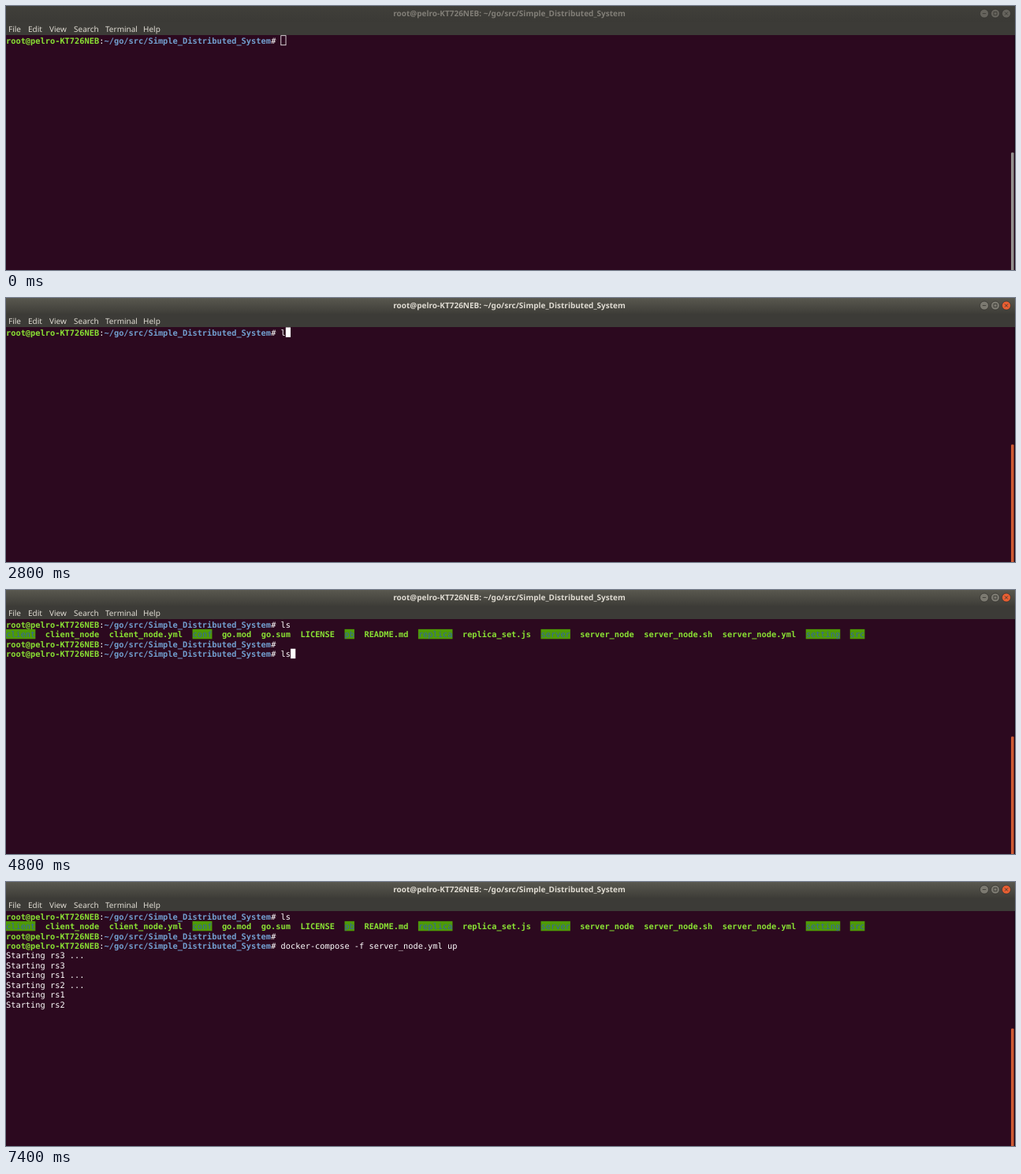
Animation of 1280 by 336 pixels, one loop 8000 ms. Source, as an HTML page:

```html
<!DOCTYPE html>
<html lang="en">
<head>
<meta charset="utf-8">
<title>Terminal</title>
<style>
  html, body { margin: 0; width: 100%; height: 100%; overflow: hidden; background: #2c091f; }
  svg { display: block; }
  text { white-space: pre; text-rendering: geometricPrecision; }
  .ui { font: 10px "Noto Sans", sans-serif; fill: #dfdbd2; }
  .title { font: 600 10px "Noto Sans", sans-serif; text-anchor: middle; }
  .term { font: 10.34px "DejaVu Sans Mono", monospace; fill: #fff; }
  .term .user, .term .file { font-weight: 700; fill: #8ae234; }
  .term .path { font-weight: 700; fill: #729fcf; }
  .term .dir { fill: #3465a4; }
</style>
</head>
<body>
<svg id="stage" width="1280" height="336" viewBox="0 0 1280 336"></svg>
<script>
const LOOP = 8000;
const CELL = { w: 6.225, h: 12.45, top: 37.4, baseline: 10.2 };
const HOST = 'root@pelro-KT726NEB';
const DIR = '~/go/src/Simple_Distributed_System';
const UP = 'docker-compose -f server_node.yml up';
const FILES = ('client/ client_node client_node.yml conf/ go.mod go.sum LICENSE pb/ README.md replica/ ' +
  'replica_set.js server/ server_node server_node.sh server_node.yml setting/ src/').split(' ');
const OUTPUT = ['rs3 ...', 'rs3', 'rs1 ...', 'rs2 ...', 'rs1', 'rs2'].map(name => 'Starting ' + name);
const MENU = [['File', 3], ['Edit', 28], ['View', 55], ['Search', 86], ['Terminal', 126], ['Help', 174]];

// Each step overrides the state built up by the steps before it.
const STEPS = [
  { at: 0, focused: false, cursor: 'hollow', pointer: null, commands: [''], output: null },
  { at: 1000, pointer: ['arrow', 358, 20] },
  { at: 1100, pointer: ['beam', 364, 42] },
  { at: 1200, pointer: ['beam', 371, 50] },
  { at: 1300, pointer: ['beam', 373.7, 52.8] },
  { at: 1600, cursor: 'block' },
  { at: 1700, focused: true },
  { at: 2200, cursor: '' },
  { at: 2700, cursor: 'block' },
  { at: 2800, commands: ['l'], pointer: null },
  { at: 2900, commands: ['ls'] },
  { at: 3100, commands: ['ls', ''] },
  { at: 3700, cursor: '' },
  { at: 4100, cursor: 'block', commands: ['ls', '', ''] },
  { at: 4600, cursor: '' },
  { at: 4700, cursor: 'block' },
  { at: 4800, commands: ['ls', '', 'ls'] },
  { at: 5400, commands: ['ls', '', 'clear'] },
  { at: 6000, commands: ['ls', '', UP] },
  { at: 6500, cursor: '' },
  { at: 6800, cursor: 'block' },
  { at: 6900, output: [] },
  { at: 7300, output: OUTPUT },
  { at: 7400, cursor: '' }
];

const rect = (x, y, w, h, fill, extra = '') =>
  `<rect x="${x}" y="${y}" width="${w}" height="${h}" fill="${fill}" ${extra}/>`;
const text = (x, y, string, attrs = '') => `<text x="${x}" y="${y}" ${attrs}>${string}</text>`;

const promptRow = command => [[HOST, 'user'], [':'], [DIR, 'path'], ['# ' + command]];

const fileRow = FILES.flatMap(name =>
  [name.endsWith('/') ? [name.slice(0, -1), 'dir'] : [name, 'file'], ['  ']]);

function terminalRows({ commands, output }) {
  const rows = commands.map(promptRow);
  if (commands.length > 1) rows.splice(1, 0, fileRow);
  if (output) rows.push(...output.map(line => [[line]]), [['']]);
  return rows;
}

function terminal(state) {
  let svg = '', col, y;
  terminalRows(state).forEach((runs, row) => {
    col = 0;
    y = CELL.top + row * CELL.h;
    for (const [string, kind = ''] of runs) {
      const x = col * CELL.w;
      if (kind === 'dir') svg += rect(x, y, string.length * CELL.w, CELL.h, '#4e9a06');
      if (string.trim()) svg += text(x, y + CELL.baseline, string, `class="${kind}"`);
      col += string.length;
    }
  });
  const x = col * CELL.w;
  if (state.cursor === 'block') svg += rect(x, y, CELL.w, CELL.h, '#fff');
  if (state.cursor === 'hollow')
    svg += rect(x + .2, y + .3, CELL.w, CELL.h - .4, 'none', 'stroke="#fff" stroke-width=".8"');
  return `<g class="term">${svg}</g>`;
}

function windowButton(x, icon, fill, stroke) {
  return `<g transform="translate(${x} 9.6)" fill="none" stroke="${stroke}" stroke-width=".9">
    <circle r="5.5" fill="${fill}" stroke="#33322e" stroke-width=".7"/><path d="${icon}"/></g>`;
}

function chrome(focused) {
  const [top, bottom, title, button, close, icon, bar] = focused
    ? ['#59584f', '#3e3d38', '#dfdbd2', '#7c7a71', '#ea5f32', '#3a3935', '#cf5b34']
    : ['#403f3a', '#3b3a36', '#817e77', '#66645d', '#66645d', '#3a3935', '#94928f'];
  return `<linearGradient id="bar" x2="0" y2="1"><stop stop-color="${top}"/>
      <stop offset="1" stop-color="${bottom}"/></linearGradient>` +
    rect(0, 0, 1280, 37, '#3c3b37') +
    rect(0, 0, 1280, 20, 'url(#bar)') +
    text(638.5, 13.2, `${HOST}: ${DIR}`, `class="title" fill="${title}"`) +
    MENU.map(([label, x]) => text(x, 32.5, label, 'class="ui"')).join('') +
    windowButton(1241, 'M-2.2 0H2.2', button, icon) +
    windowButton(1255, 'M-2-2H2V2H-2Z', button, icon) +
    windowButton(1269, 'M-2-2L2 2M2-2L-2 2', close, icon) +
    rect(1278.8, 37, 1.2, 299, '#1d0717') +
    rect(1275, 186.5, 3.6, 150, bar, 'rx="1"');
}

function mouse([shape, x, y]) {
  const path = shape === 'beam'
    ? '<path d="M-2.4-4.6H-.6L0-4L.6-4.6H2.4M0-4V4M-2.4 4.6H-.6L0 4L.6 4.6H2.4" fill="none" stroke="#c3cdbf" stroke-width=".9"/>'
    : '<path d="M0 0V12L2.8 9.4L4.6 13.4L6.3 12.6L4.6 8.8H8.4Z" fill="#111" stroke="#fff" stroke-width=".8"/>';
  return `<g transform="translate(${x} ${y})">${path}</g>`;
}

const stage = document.getElementById('stage');
let shown = -1;

function draw() {
  const time = performance.now() % LOOP;
  const past = STEPS.filter(step => step.at <= time);
  if (past.length !== shown) {
    shown = past.length;
    const state = Object.assign({}, ...past);
    stage.innerHTML = rect(0, 0, 1280, 336, '#2c091f') + terminal(state) + chrome(state.focused) +
      (state.pointer ? mouse(state.pointer) : '');
  }
  requestAnimationFrame(draw);
}
draw();
</script>
</body>
</html>
```
